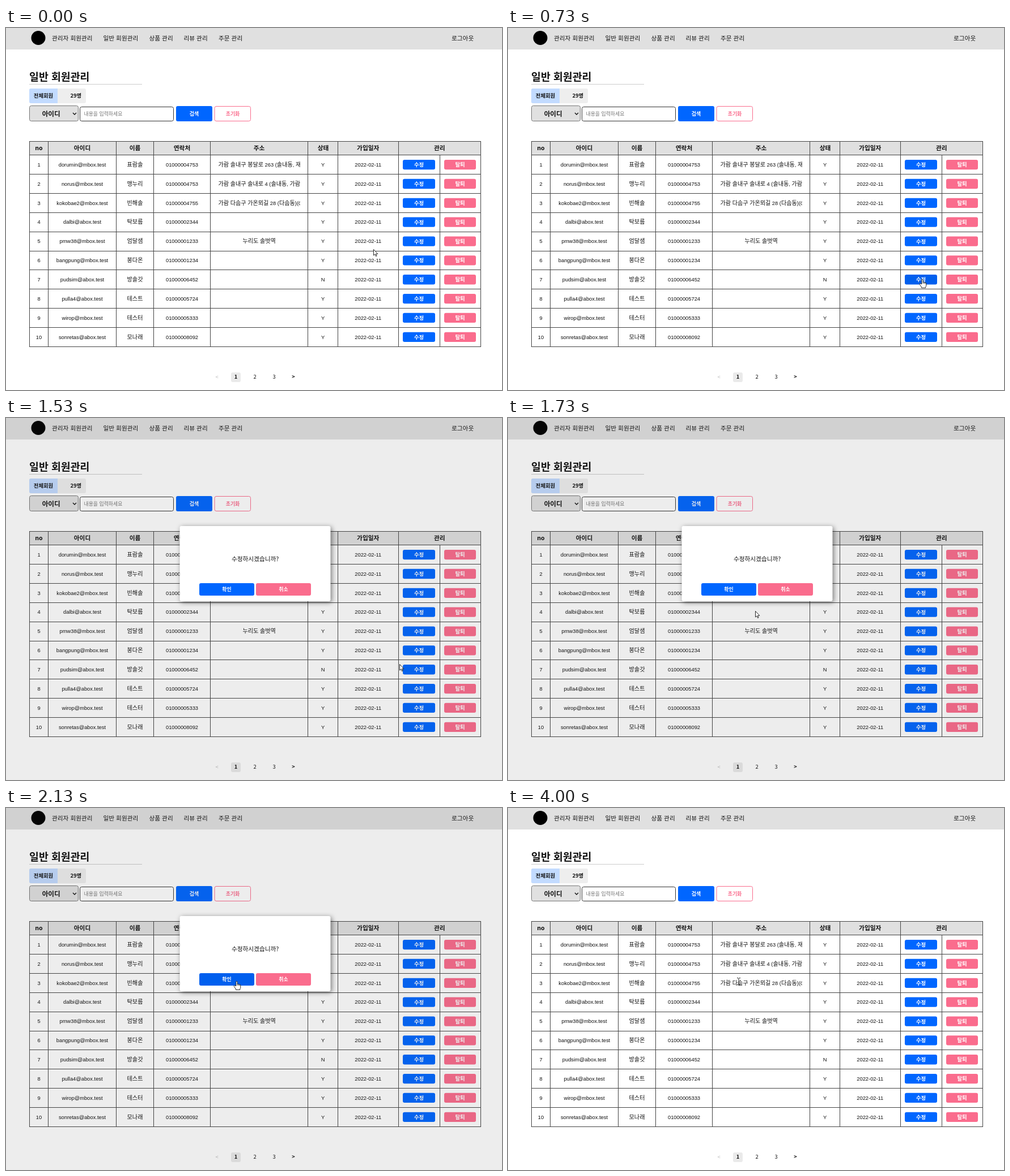
Recreate the animation shown at these times as an HTML page. Size 875 by 640 pixels, loop 5730 ms.

```html
<!DOCTYPE html>
<html lang="ko">
<head>
<meta charset="utf-8">
<title>일반 회원관리</title>
<style>
  html, body { margin: 0; width: 100%; height: 100%; overflow: hidden; background: #fff; }
  svg { display: block; }
  text { font-family: 'Noto Sans CJK KR', 'Noto Sans CJK', 'Noto Sans', sans-serif; white-space: pre; }
  text.cell { font-family: 'Liberation Sans', 'Noto Sans CJK KR', 'Noto Sans CJK', sans-serif; }
  text.cell tspan { font-size: 10.1px; font-weight: 300; }
  .modal-box { filter: drop-shadow(2px 2px 4px rgba(0, 0, 0, .5)); }
</style>
</head>
<body>
<svg id="stage" width="875" height="640" viewBox="0 0 875 640"></svg>
<script>
const LOOP = 5730;
const ROW = 33.85;
const BLUE = '#0066ff', HOVER = '#005fee', PINK = '#fa6c8d', GRAY = '#e0e0e0', INK = '#111';

const rect = (x, y, w, h, fill, r = 0, extra = '') =>
  `<rect x="${x}" y="${y}" width="${w}" height="${h}" rx="${r}" fill="${fill}" ${extra}/>`;
const line = (x1, y1, x2, y2, color = '#444') =>
  `<path d="M${x1} ${y1}L${x2} ${y2}" stroke="${color}"/>`;
// y is the visual middle of the line of text
const label = (s, x, y, { size = 10.67, weight = 400, fill = INK, anchor = 'middle' } = {}) =>
  `<text x="${x}" y="${y + size * 0.37}" font-size="${size}" font-weight="${weight}" fill="${fill}" text-anchor="${anchor}">${s}</text>`;
const cell = (s, x, y, anchor = 'middle', extra = '') => {
  const mixed = String(s).replace(/[가-힣]+/g, '<tspan>$&</tspan>');
  return `<text class="cell" x="${x}" y="${y + 3.3}" font-size="9.33" fill="${INK}" text-anchor="${anchor}" ${extra}>${mixed}</text>`;
};
const button = (s, x, y, w, h, fill, { id = '', size = 8.89 } = {}) =>
  rect(x, y, w, h, fill, 3, id && `id="${id}"`) +
  label(s, x + w / 2, y + h / 2, { size, weight: 700, fill: '#fff' });

const members = [
  ['dorumin@mbox.test', '표람솔', '01000004753', '가람 솔내구 봉달로 263 (솔내동, 재'],
  ['norus@mbox.test', '맹누리', '01000004753', '가람 솔내구 솔내로 4 (솔내동, 가람'],
  ['kokobae2@mbox.test', '빈해솔', '01000004755', '가람 다솜구 가온뫼길 28 (다솜동)(0'],
  ['dalbi@abox.test', '탁보름', '01000002344', ''],
  ['pmw38@mbox.test', '엄달샘', '01000001233', '누리도 솔벗역'],
  ['bangpung@mbox.test', '봉다온', '01000001234', ''],
  ['pudsim@abox.test', '방솔갓', '01000006452', ''],
  ['pulla4@abox.test', '테스트', '01000005724', ''],
  ['wirop@mbox.test', '테스터', '01000005333', ''],
  ['sonretas@abox.test', '모나래', '01000008092', ''],
];

function header() {
  const nav = [['관리자 회원관리', 81], ['일반 회원관리', 171.5], ['상품 관리', 252.5],
    ['리뷰 관리', 313.5], ['주문 관리', 375], ['로그아웃', 786]];
  return rect(0, 0, 875, 38, GRAY) + '<circle cx="57" cy="17.5" r="12.5" fill="#000"/>' +
    nav.map(([s, x]) => label(s, x, 17.7, { weight: 500, anchor: 'start' })).join('');
}

function filters() {
  return label('일반 회원관리', 41, 86, { size: 18.35, weight: 700, anchor: 'start' }) +
    line(41, 99.5, 240, 99.5, '#ccc') +
    rect(41, 107, 100, 26, '#eee', 3) +
    '<path d="M91 107H44a3 3 0 0 0-3 3v20a3 3 0 0 0 3 3H91Z" fill="#c2dbff"/>' +
    label('전체회원', 66, 120, { size: 9.33, weight: 700 }) +
    label('29명', 133, 120, { size: 9.33, weight: 700, anchor: 'end' }) +
    rect(41.5, 137.5, 86, 27, GRAY, 3, 'stroke="#767676"') +
    label('아이디', 79.7, 151.5, { size: 11.6, weight: 700 }) +
    '<path d="M118 150l3 3 3-3" fill="none" stroke="#111" stroke-width="1.4"/>' +
    rect(130.5, 139.5, 165, 25, '#fff', 3, 'stroke="#333"') +
    label('내용을 입력하세요', 137.5, 152, { size: 8.89, fill: '#757575', anchor: 'start' }) +
    button('검색', 300, 138, 64, 27, BLUE) +
    rect(368, 138.5, 63.5, 26, '#fff', 3, `stroke="${PINK}"`) +
    label('초기화', 400, 152, { size: 8.89, weight: 700, fill: PINK });
}

function table() {
  const lineY = i => Math.round(224 + 33.9 * i) + 0.5;
  const heads = [['no', 58], ['아이디', 134.5], ['이름', 227.5], ['연락처', 310.5],
    ['주소', 446.5], ['상태', 559.5], ['가입일자', 638.7], ['관리', 764.7]];
  let out = rect(41, 200, 797, 25, GRAY) +
    '<clipPath id="address"><rect x="374" y="225" width="145" height="340"/></clipPath>' +
    heads.map(([s, x]) => label(s, x, 212.3, { weight: 700 })).join('');

  members.forEach(([mail, name, phone, address], i) => {
    const y = 241.6 + ROW * i, top = y - 8.6;
    out += cell(i + 1, 58, y) + cell(mail, 134.5, y) + cell(name, 227.5, y) + cell(phone, 310.5, y) +
      (address.length > 10
        ? cell(address, 374.5, y, 'start', 'clip-path="url(#address)"')
        : cell(address, 446.7, y)) +
      cell(i === 6 ? 'N' : 'Y', 559, y) + cell('2022-02-11', 638.8, y) +
      button('수정', 700, top, 57, 17.3, BLUE, { id: 'edit' + i, size: 9.33 }) +
      button('탈퇴', 773, top, 56, 17.3, PINK, { size: 9.33 });
  });

  out += line(41, 200.5, 838, 200.5);
  for (let i = 0; i <= 10; i++) out += line(41, lineY(i), 838, lineY(i));
  for (const x of [41.5, 74.5, 194.5, 260.5, 360.5, 532.5, 585.5, 692.5, 765.5, 837.5])
    out += line(x, x === 765.5 ? 224.5 : 200.5, x, 563.5);
  return out;
}

function pagination() {
  const page = (s, x, weight = 400, fill = INK) => label(s, x, 617, { size: 9.33, weight, fill });
  return rect(397, 609, 17, 17, '#eaeaea', 3) + page('&lt;', 372, 400, '#bbb') +
    page('1', 405.5, 700) + page('2', 439, 500) + page('3', 473, 500) + page('&gt;', 507, 700);
}

const modal = (id, message, buttons) => `<g id="${id}">` +
  rect(306.5, 191, 266, 133, '#fff', 3, 'class="modal-box"') +
  label(message, 439.7, 249, { weight: 500 }) + buttons + '</g>';

const cursors = `
  <g id="arrow" fill="#fff" stroke="#111" stroke-width=".9" stroke-linejoin="round">
    <path d="M.5 .5V11L2.9 8.9L4.5 12.6L6.1 11.9L4.5 8.3H7.8Z"/></g>
  <g id="hand" fill="#fff" stroke="#111" stroke-width=".9" stroke-linejoin="round">
    <path d="M-1.2 8.5V1.5a1.2 1.2 0 0 1 2.4 0V5.4q1.2-.7 2 .4q1.3-.6 1.9.5q1.6-.3 1.7 1.2V11q0 1.6-1 2.7V15.3H-1.6V14L-4.7 9.4q-.6-1.2.4-1.7q1-.3 1.8.8Z"/>
    <path d="M1.2 5.4V8M3.2 5.8V8.2M5.1 6.3V8.4" stroke-width=".7"/></g>
  <g id="beam" fill="none" stroke="#222">
    <path d="M-3 -5.5H-1L0 -4.5L1 -5.5H3M0 -4.5V5.5M-3 6.5H-1L0 5.5L1 6.5H3"/></g>`;

const stage = document.getElementById('stage');
stage.innerHTML = header() + filters() + table() + pagination() +
  rect(0, 0, 875, 640, '#3c3c3c', 0, 'id="dim"') +
  modal('ask', '수정하시겠습니까?',
    button('확인', 341, 292, 97, 22, BLUE, { id: 'ok' }) + button('취소', 441, 292, 97, 22, PINK)) +
  modal('notice', '수정한 값이 없습니다.', button('확인', 341, 292, 197, 22, HOVER)) + cursors;

// Pointer stops: [time, x, y, shape]; each holds until the next
const stops = [[0, 648, 391, 'arrow']];
for (let k = 1; k <= 9; k++) {
  const u = k / 9, e = u * u * (3 - 2 * u);
  stops.push([Math.floor((k * 200 + 10) / 30) * 10, 648 + 83 * e, 391 + 47 * e, k < 9 ? 'arrow' : 'hand']);
}
stops.push(
  [670, 731, 442, 'hand'], [730, 731, 444, 'hand'], [1330, 730, 444, 'arrow'],
  [1530, 694, 435, 'arrow'], [1600, 590, 402, 'arrow'], [1660, 496, 366, 'arrow'],
  [1730, 436, 341, 'arrow'], [1800, 415, 325, 'arrow'], [1860, 408, 312, 'hand'],
  [1930, 406, 308, 'hand'], [2070, 406, 307, 'hand'], [2130, 407, 306, 'hand'],
  [4000, 407, 306, 'beam']);

const byId = id => document.getElementById(id);
const show = (id, on) => byId(id).setAttribute('visibility', on ? 'visible' : 'hidden');

function draw(t) {
  const asking = t >= 1270 && t < 2270, noticing = t >= 2270 && t < 4000;
  show('ask', asking);
  show('notice', noticing);
  byId('dim').setAttribute('opacity', asking ? 0.092 : noticing ? 0.176 : 0);
  byId('edit6').setAttribute('fill', t >= 600 && t < 1330 ? HOVER : BLUE);
  byId('ok').setAttribute('fill', t >= 1860 ? HOVER : BLUE);

  const [, x, y, shape] = stops.findLast(s => s[0] <= t);
  for (const id of ['arrow', 'hand', 'beam']) show(id, id === shape);
  byId(shape).setAttribute('transform', `translate(${Math.round(x)} ${Math.round(y)})`);
}

const start = performance.now();
function tick() {
  draw((performance.now() - start) % LOOP);
  requestAnimationFrame(tick);
}
tick();
</script>
</body>
</html>
```
